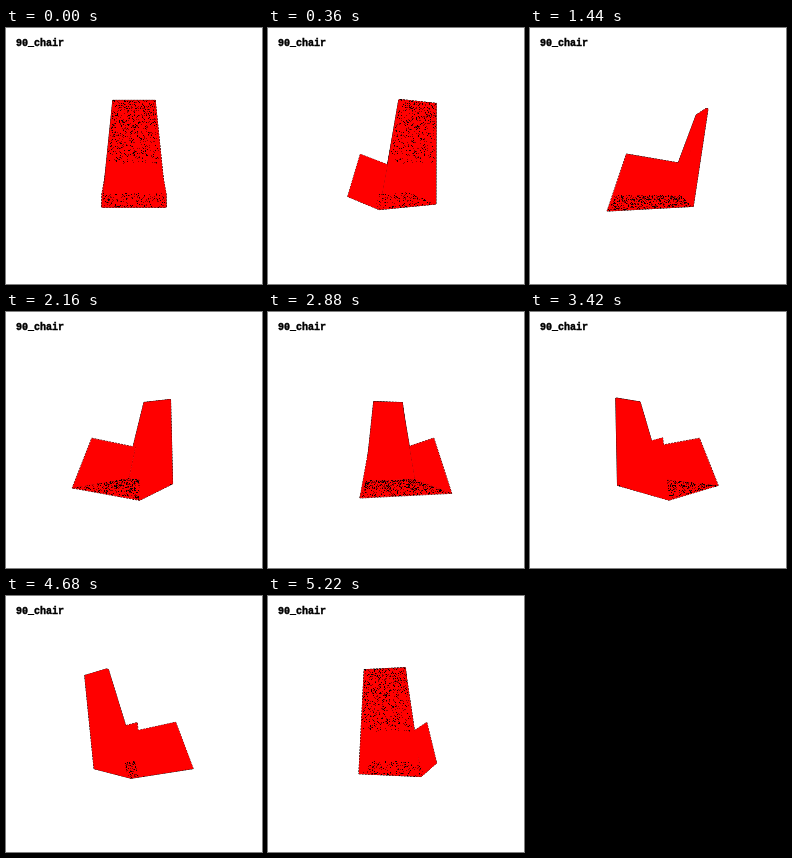
Recreate the animation shown at these times as an HTML page with a canvas. Size 256 px wide and 256 px high, loop 5.4 s.

```html
<!DOCTYPE html>
<html lang="en">
<head>
<meta charset="utf-8">
<title>Turning chair</title>
<style>
  html, body { margin: 0; width: 100%; height: 100%; overflow: hidden; background: #fff; }
  canvas { position: absolute; left: 0; top: 0; }
  p {
    position: absolute; left: 10px; top: 10px; margin: 0; color: #000;
    font: bold 10px/12px "Liberation Mono", "DejaVu Sans Mono", monospace;
    -webkit-text-stroke: 0.4px #000;
  }
</style>
</head>
<body>
<canvas id="stage" width="256" height="256"></canvas>
<p>90_chair</p>
<script>
const ctx = document.getElementById('stage').getContext('2d');
const STEP = 180, STEPS = 30, FOCAL = 235, MID = 128;
const RED = '#f00';

// Side profile: half width, height, forward distance
const P = {
  backTop:   [0.0725,  0.1905, -0.195],
  frontTop:  [0.0725,  0.1905, -0.186],
  joint:     [0.08,   -0.0325, -0.103],
  seatFront: [0.12,    0.0075,  0.13],
  footFront: [0.163,  -0.1915,  0.195],
  footBack:  [0.12,   -0.1915, -0.122]
};

const side = s => Object.values(P).map(([u, y, w]) => [u * s, y, w]);
const mirror = ([u, y, w]) => [-u, y, w];
const band = (a, b) => [a, b, mirror(b), mirror(a)];
const mix = (a, b, t) => a.map((v, i) => v + (b[i] - v) * t);

const panels = [
  side(1), side(-1),
  band(P.backTop, P.footBack),
  band(P.frontTop, P.joint),
  band(P.backTop, P.frontTop),
  band(P.footFront, P.footBack)
];

function seeded(seed) {
  return () => (seed = (seed * 16807) % 2147483647) / 2147483647;
}

// Random specks on a mirrored panel running from a to b
function scatter(count, a, b, seed) {
  const rnd = seeded(seed);
  return Array.from({ length: count }, () => {
    const t = rnd(), p = mix(a, b, t);
    p[0] *= (rnd() * 2 - 1) * 0.97;
    return { p, t, rank: rnd(), color: rnd() < 0.45 ? '#100' : '#800' };
  });
}
const floorSpecks = scatter(480, P.footFront, P.footBack, 4127);
const backSpecks = scatter(1400, P.backTop, P.footBack, 9241);

function draw(step) {
  const angle = step / STEPS * 2 * Math.PI;
  const c = Math.cos(angle), s = Math.sin(angle);

  const project = ([u, y, w]) => {
    const k = FOCAL / (1 + w * c + u * s);
    return [MID + (u * c - w * s) * k, MID - y * k];
  };
  const trace = points => {
    ctx.beginPath();
    points.forEach(p => ctx.lineTo(...project(p)));
    ctx.closePath();
  };
  const fill = points => { trace(points); ctx.fillStyle = RED; ctx.fill(); };
  const speck = ({ p, color }) => {
    const [x, y] = project(p);
    ctx.fillStyle = color;
    ctx.fillRect(Math.floor(x), Math.floor(y), 1, 1);
  };

  ctx.fillStyle = '#fff';
  ctx.fillRect(0, 0, 256, 256);

  // Broken dark rim, left visible only around the silhouette
  ctx.strokeStyle = '#300';
  ctx.lineWidth = 1;
  ctx.lineJoin = 'bevel';
  ctx.setLineDash([2, 1]);
  panels.forEach(points => { trace(points); ctx.stroke(); });
  panels.forEach(fill);

  const floorShare = c > 0.9 ? 0.4 : 1;
  floorSpecks.filter(d => d.rank < floorShare).forEach(speck);

  // Walls seen at a slant hide the floor, except at the rear corner
  if (Math.abs(s) < 0.95) {
    const near = s > 0 ? -1 : 1;
    const corner = mix(P.footFront, P.footBack, 0.9);
    fill([P.seatFront, P.footFront, corner, P.joint].map(([u, y, w]) => [u * near, y, w]));
  }
  if (c > 0 && c < 0.9) {
    const [u, y, w] = P.footBack;
    fill(band(P.backTop, [u * 0.85, y, w]));
  }

  // The backrest thins out when faced from behind
  const facing = Math.max(0, Math.min(1, (c - 0.75) * 4.5));
  backSpecks
    .filter(d => d.t < 0.57 && d.rank < facing * (0.9 - d.t * 0.6))
    .forEach(speck);
}

let shown = -1;
const start = performance.now();
function tick() {
  const step = Math.floor((performance.now() - start) / STEP) % STEPS;
  if (step !== shown) draw(shown = step);
  requestAnimationFrame(tick);
}
tick();
</script>
</body>
</html>
```
